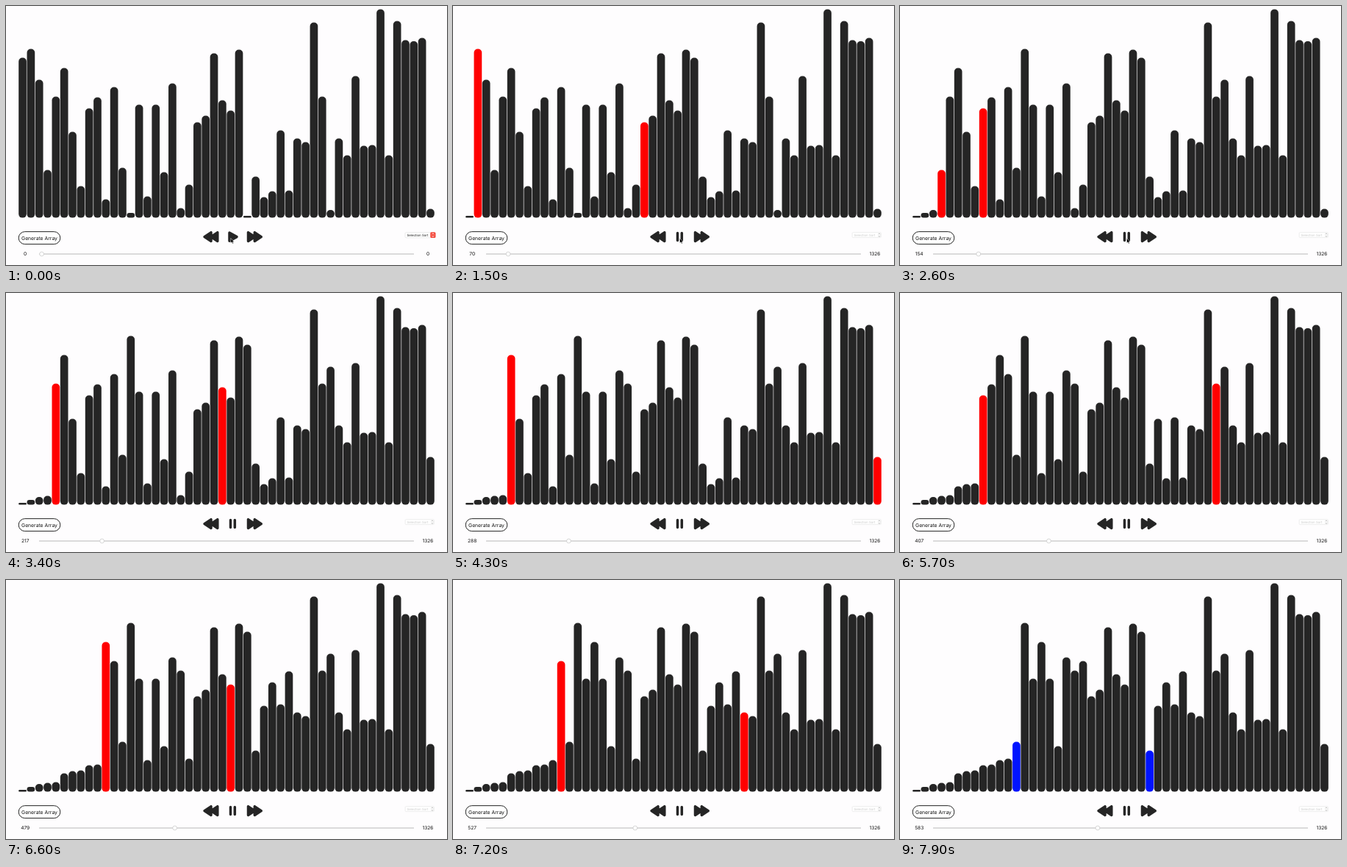
Write an HTML page that moves like this. It is 600x353 px and loops after 8 s.

```html
<!DOCTYPE html>
<html lang="en">
<head>
<meta charset="utf-8">
<title>Selection sort</title>
<style>
  html, body { margin: 0; width: 100%; height: 100%; overflow: hidden; background: #fefdfe; }
  svg { display: block; width: 600px; height: 353px; font-family: Inter, Roboto, sans-serif; }
  text { text-anchor: middle; fill: #111; font-size: 6.6px; text-rendering: geometricPrecision; }
  .icon { fill: #252525; stroke: #252525; stroke-width: 3.5; stroke-linejoin: round; }
  .menu text { font-size: 4.4px; }
  .menu path { fill: none; stroke-width: .8; }
</style>
</head>
<body>
<svg viewBox="0 0 600 353">
  <g id="bars"></g>

  <rect x="17.2" y="307.6" width="56.6" height="17" rx="8.5" fill="#fff" stroke="#252525"/>
  <text x="45.5" y="318.6" style="font-size:6.8px">Generate Array</text>

  <g class="icon">
    <path id="skip" d="M270 314.6L279 308.6V320.6ZM278.8 314.6L287.8 308.6V320.6Z"/>
    <use href="#skip" transform="translate(617.3 0) scale(-1 1)"/>
    <path id="play" d="M304 309V320.2L314 314.6Z"/>
    <path id="pause" d="M305.5 309.4V319.6M311.3 309.4V319.6" stroke-linecap="round"/>
  </g>
  <path id="cursor" d="M0 0V6.6L1.5 5.3L2.6 7.6L3.7 7.1L2.7 4.9H4.6Z" stroke="#fff" stroke-width=".5"/>

  <g id="menuOn" class="menu">
    <rect x="543" y="308.6" width="41" height="7.2" rx="1.5" fill="#fff" stroke="#ddd" stroke-width=".6"/>
    <text x="560" y="313.6">Selection Sort</text>
    <rect x="577.3" y="308.2" width="7.2" height="7.8" rx="1.5" fill="#f4493c"/>
    <path id="arrows" d="M579.5 311.3L580.9 309.7L582.3 311.3M579.5 313L580.9 314.6L582.3 313" stroke="#fff"/>
  </g>
  <g id="menuOff" class="menu">
    <rect x="543.2" y="308.6" width="39.2" height="7" rx="1.2" fill="#fff" stroke="#e2e2e2" stroke-width=".6"/>
    <text x="560" y="313.6" style="fill:#c8c8c8">Selection Sort</text>
    <path d="M578.6 311.3L580 309.8L581.4 311.3M578.6 313L580 314.5L581.4 313" stroke="#aaa"/>
  </g>

  <path d="M45 338H555" stroke="#b8b8b8"/>
  <circle id="thumb" cy="338" r="2.9" fill="#fff" stroke="#c4c4c4" stroke-width=".7"/>
  <text id="stepLabel" x="26.2" y="340.3"></text>
  <text id="totalLabel" x="574" y="340.3"></text>
</svg>
<script>
const LOOP = 8000, TICK = 100, PLAY_AT = 500, CURSOR_GONE = 3200;
const BASE = 288.6, LEFT = 17.2, PITCH = 11.325, BAR_WIDTH = 10.7, RADIUS = 5;
const DARK = '#252525', COMPARE = '#f00', SWAP = '#0014ff';

// The array to sort: bar heights in pixels.
const input = [
  218, 230, 188, 65, 165, 204, 117, 43, 149, 164, 25, 178, 68, 6.5, 154, 29, 154, 62, 183, 13,
  45, 130, 139, 224, 160, 146, 229, 2.5, 56, 28, 36, 119, 37, 108, 103, 266, 165, 10.5, 108, 85,
  193, 98, 99, 284, 85, 268, 242, 240.5, 245, 12];

// Playback keys: [time in ms, step], steady in between.
const pace = [[600, 0], [1500, 70], [2600, 154], [4300, 288], [5700, 407], [6600, 479], [7900, 583]];

// Each pass compares i with every later bar, then shows the pair before and after the swap.
function buildTrace() {
  const values = [...input], trace = [];
  const record = (a, b, color) => trace.push({ values: [...values], a, b, color });
  for (let i = 0; i < values.length; i++) {
    let min = i;
    for (let j = i + 1; j < values.length; j++) {
      record(i, j, COMPARE);
      if (values[j] < values[min]) min = j;
    }
    record(i, min, SWAP);
    [values[i], values[min]] = [values[min], values[i]];
    record(i, min, SWAP);
  }
  record(-1, -1, DARK);
  return trace;
}

function stepAt(time) {
  const k = pace.findIndex(([t]) => t >= time);
  if (k <= 0) return 0;
  const [t0, s0] = pace[k - 1], [t1, s1] = pace[k];
  return Math.floor(s0 + (s1 - s0) * (time - t0) / (t1 - t0));
}

const trace = buildTrace();
const idle = { values: input, a: -1, b: -1, color: DARK };
const el = id => document.getElementById(id);
const show = (id, on) => { el(id).style.display = on ? '' : 'none'; };
const setAll = (node, attrs) => {
  for (const name in attrs) node.setAttribute(name, attrs[name]);
};
const bars = input.map((_, i) => {
  const bar = document.createElementNS('http://www.w3.org/2000/svg', 'rect');
  setAll(bar, { x: LEFT + i * PITCH, width: BAR_WIDTH });
  return el('bars').appendChild(bar);
});

function draw(time) {
  const playing = time >= PLAY_AT;
  const step = stepAt(time);
  const { values, a, b, color } = playing ? trace[step] : idle;

  bars.forEach((bar, i) => setAll(bar, {
    y: BASE - values[i],
    height: values[i],
    rx: Math.min(RADIUS, values[i] / 2),
    fill: i === a || i === b ? color : DARK
  }));

  show('play', !playing);
  show('pause', playing);
  show('menuOn', !playing);
  show('menuOff', playing);
  show('cursor', time < CURSOR_GONE);
  setAll(el('cursor'), { transform: `translate(${playing ? 308.5 : 305.8} 316.5)` });
  setAll(el('thumb'), { cx: 48.6 + step * 0.378 });
  el('stepLabel').textContent = step;
  el('totalLabel').textContent = playing ? trace.length : 0;
}

const start = performance.now();
function frame() {
  const time = (performance.now() - start) % LOOP;
  draw(Math.floor(time / TICK) * TICK);
  requestAnimationFrame(frame);
}
frame();
</script>
</body>
</html>
```
